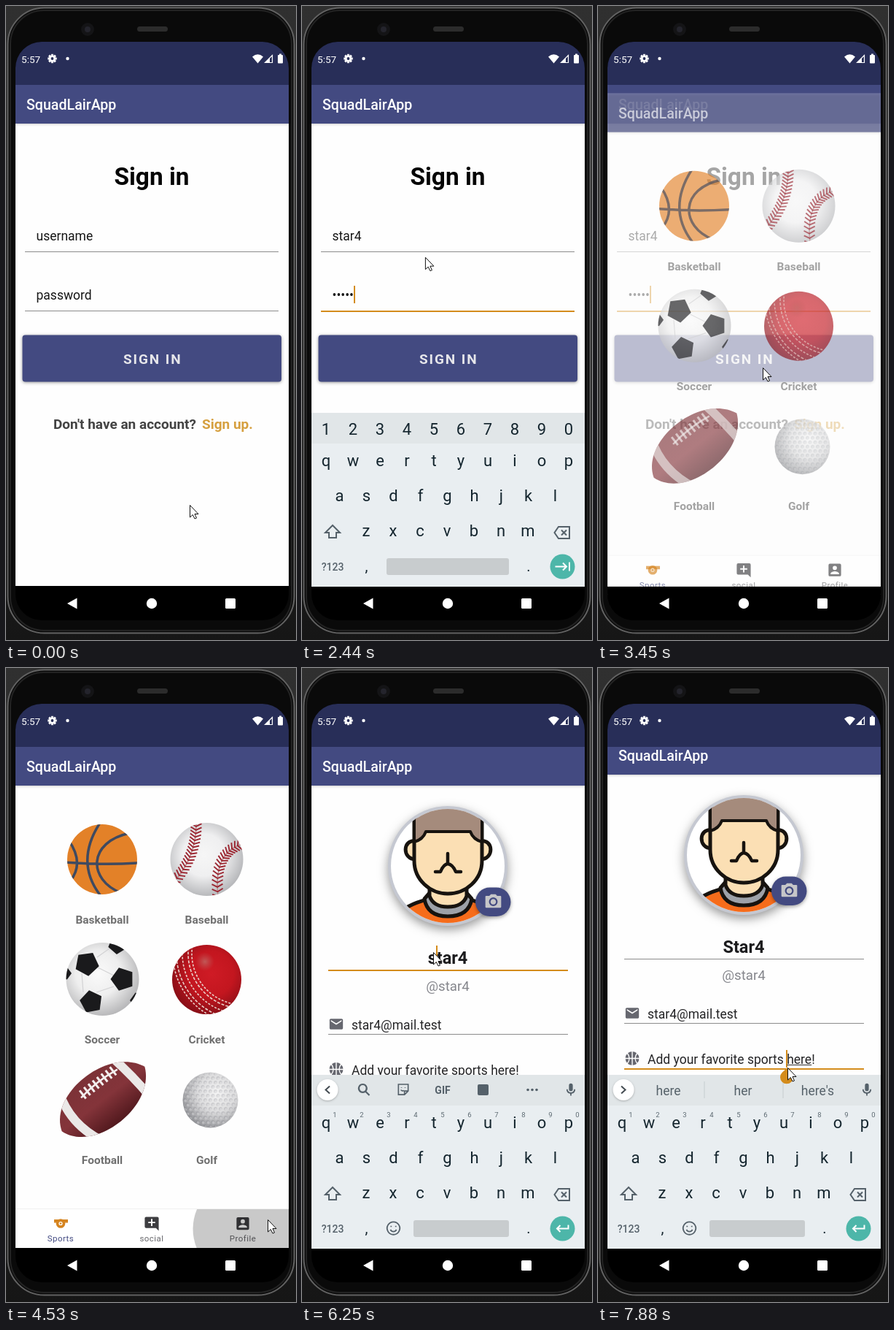
An HTML page with a canvas that plays this animation: 398 px wide and 868 px high, repeating every 8 s.

```html
<!DOCTYPE html>
<html lang="en">
<head>
<meta charset="utf-8">
<title>Sports app demo</title>
<style>
html, body { margin: 0; width: 100%; height: 100%; overflow: hidden; background: #000; }
canvas { display: block; }
</style>
</head>
<body>
<canvas id="stage" width="398" height="868"></canvas>
<script>
const c = document.getElementById('stage').getContext('2d');
const LOOP = 8000, TAU = Math.PI * 2;
const INDIGO = '#434a81', ORANGE = '#d48c1c', GRAY = '#8c8c8c', KEY = '#14252e', KEYICON = '#55616a';
const USER = 'star4';

const MAIL = 'M20 4H4c-1.1 0-2 .9-2 2v12c0 1.1.9 2 2 2h16c1.1 0 2-.9 2-2V6c0-1.1-.9-2-2-2zm0 4l-8 5-8-5V6l8 5 8-5z';
const PERSON = 'M3 5v14a2 2 0 0 0 2 2h14a2 2 0 0 0 2-2V5a2 2 0 0 0-2-2H5a2 2 0 0 0-2 2zm12 4a3 3 0 1 1-6 0 3 3 0 0 1 6 0zm-9 8c0-2 4-3.1 6-3.1s6 1.1 6 3.1v1H6z';
const ADD = 'M22 4a2 2 0 0 0-2-2H4a2 2 0 0 0-2 2v12a2 2 0 0 0 2 2h14l4 4zm-5 7h-4v4h-2v-4H7V9h4V5h2v4h4z';
const MIC = 'M12 14a3 3 0 0 0 3-3V5a3 3 0 0 0-6 0v6a3 3 0 0 0 3 3zm5-3a5 5 0 0 1-10 0H5a7 7 0 0 0 6 6.9V21h2v-3.1a7 7 0 0 0 6-6.9z';
const SEARCH = 'M15 15l6 6M10 3a6.5 6.5 0 1 0 .01 0';
const CAMERA = 'M9 3L7 5H3a1 1 0 0 0-1 1v13a1 1 0 0 0 1 1h18a1 1 0 0 0 1-1V6a1 1 0 0 0-1-1h-4l-2-2zm3 4a5.5 5.5 0 1 1 0 11 5.5 5.5 0 0 1 0-11zm0 2a3.5 3.5 0 1 0 .01 0z';
const SHIFT = 'M12 3L2 13h5v7h10v-7h5z';
const ERASE = 'M7 4h15v16H7L1.500 12zM11 8.500l7 7M18 8.500l-7 7';
const FACE = 'M12 2.500a9.500 9.500 0 1 0 .01 0M8.500 8.500v1.500M15.500 8.500v1.500M7.500 14c2 4 7 4 9 0';
const UPDATE = 'M20 12a8 8 0 1 1-3-6.300M20.500 3v5h-5M12 7.500v5l3.500 2';
const EXIT = 'M8 7V3.500h13v17H8V17M2 12h12M10.500 8l4 4-4 4';
const STICKER = 'M4 3h16v11l-6 6H4zM14 20v-6h6M9 8v1M15 8v1M8 12c1 2 4 2 5 1';
const ENTER = 'M20 7v5H5M9 7.500L4.500 12 9 16.500';
const TAB = 'M2 12h15M12.500 7l5 5-5 5M21.500 6v12';

const clamp = (v) => Math.max(0, Math.min(1, v));
const span = (t, a, b) => clamp((t - a) / (b - a));
const ease = (p) => p * p * (3 - 2 * p);

function text(s, x, y, size, color, weight = 400, align = 'left', spacing = 0) {
  c.font = `${weight} ${size}px Roboto, sans-serif`;
  c.letterSpacing = spacing + 'px';
  c.textAlign = align;
  c.fillStyle = color;
  c.fillText(s, x, y);
  return c.measureText(s).width;
}
function rect(x, y, w, h, color) { c.fillStyle = color; c.fillRect(x, y, w, h); }
function round(x, y, w, h, r, fill, stroke, lw = 1) {
  c.beginPath(); c.roundRect(x, y, w, h, r);
  if (fill) { c.fillStyle = fill; c.fill(); }
  if (stroke) { c.strokeStyle = stroke; c.lineWidth = lw; c.stroke(); }
}
function disc(x, y, r, fill) { c.beginPath(); c.arc(x, y, r, 0, TAU); c.fillStyle = fill; c.fill(); }
function draw(d, { fill, stroke, lw = 2 }) {
  const p = new Path2D(d);
  if (fill) { c.fillStyle = fill; c.fill(p, 'evenodd'); }
  if (stroke) { c.strokeStyle = stroke; c.lineWidth = lw; c.stroke(p); }
}
function icon(d, x, y, size, style) {
  c.save();
  c.translate(x - size / 2, y - size / 2);
  c.scale(size / 24, size / 24);
  draw(d, style);
  c.restore();
}
function within(shape, paint) {
  c.save(); c.beginPath(); shape(); c.clip(); paint(); c.restore();
}
function shadowed(color, blur, dy, paint) {
  c.save(); c.shadowColor = color; c.shadowBlur = blur; c.shadowOffsetY = dy; paint(); c.restore();
}
function radial(x, y, r, ...colors) {
  const g = c.createRadialGradient(x, y, 0, x, y, r);
  colors.forEach((col, i) => g.addColorStop(i / (colors.length - 1), col));
  return g;
}
function vertical(y0, y1, ...colors) {
  const g = c.createLinearGradient(0, y0, 0, y1);
  colors.forEach((col, i) => g.addColorStop(i / (colors.length - 1), col));
  return g;
}
function line(y, focused, x0, x1) {
  rect(x0, y, x1 - x0, focused ? 2 : 1, focused ? ORANGE : GRAY);
}
const caret = (x, y) => rect(Math.round(x), y, 2, 24, ORANGE);

// Phone body and system bars
function phone() {
  rect(0, 0, 398, 868, vertical(0, 868, '#303030', '#161616'));
  round(2.500, 2.500, 393, 856, 50, '#0a0a0a', '#626262', 2);
  round(6, 6, 386, 849, 46, null, '#232323', 2);
  disc(112, 32, 9, '#141416');
  disc(112, 32, 4, '#24242c');
  round(180, 28, 42, 7, 3.500, '#2c2c2c');
}
function statusBar() {
  rect(13, 49, 375, 59, '#282e58');
  text('5:57', 21, 77.500, 13.6, '#fff');
  c.save();
  c.translate(63.500, 72);
  for (let i = 0; i < 8; i++) { c.rotate(TAU / 8); rect(-1.500, -6.200, 3, 4, '#fff'); }
  disc(0, 0, 4.600, '#fff'); disc(0, 0, 1.900, '#282e58');
  c.restore();
  disc(84.500, 72, 2.200, '#fff');
  draw('M338 69.500Q345.500 63 353 69.500L345.500 78.500Z', { fill: '#fff' });
  draw('M355.500 77.500L365.500 67.500V77.500Z', { stroke: '#fff', lw: 1.2 });
  draw('M355 78L362 71V78Z', { fill: '#fff' });
  round(373, 67, 7, 11.500, 1, '#fff');
  rect(375, 65.500, 3, 2, '#fff');
}
function navButtons() {
  draw('M84 818L97.500 810.500V825.500Z', { fill: '#fff' });
  disc(200, 818, 7.200, '#fff');
  round(301, 811, 14, 14, 1.500, '#fff');
}
function page(dy = 0) {
  rect(13, 108, 375, 686, '#fefefe');
  shadowed('rgba(0,0,0,.2)', 3, 1, () => rect(13, 108 + dy, 375, 53, INDIGO));
  text('SquadLairApp', 28, 142 + dy, 19.600, '#fff', 500);
}

// Keyboard
function keyboard(kind, show, words) {
  if (show <= 0) return;
  c.save();
  c.globalAlpha = show;
  c.translate(0, 50 * (1 - show));
  rect(13, 557, 375, 238, '#e9eef1');
  rect(13, 557, 375, 42, '#e1e6e8');
  const secret = kind === 'secret', col = (i) => 33 + 37 * i;
  if (secret) {
    [...'1234567890'].forEach((d, i) => text(d, col(i), 586.500, 22, KEY, 400, 'center'));
  } else {
    toolbar(words);
    [...'1234567890'].forEach((d, i) => text(d, col(i) + 12, 615, 9.500, '#5d6a72', 400, 'center'));
  }
  const row = (keys, x, y) => [...keys].forEach((k, i) => text(k, x + 37 * i, y, 22, KEY, 400, 'center'));
  row('qwertyuiop', 33, 630);
  row('asdfghjkl', 51.500, 678);
  row('zxcvbnm', 88, 726);
  icon(SHIFT, 42, 720, 24, { stroke: KEYICON });
  icon(ERASE, 357, 721, 24, { stroke: KEYICON });
  text('?123', 42, 772.500, 14, KEYICON, 500, 'center');
  text(',', 88.500, 774, 20, KEY, 400, 'center');
  text('.', 311, 774, 20, KEY, 400, 'center');
  if (!secret) icon(FACE, 125.500, 767, 22, { stroke: KEYICON });
  const left = secret ? 116 : 153;
  round(left, 756, 284 - left, 23, 3, '#c8ccce');
  disc(357.500, 767.500, 17, '#4db6a9');
  icon(secret ? TAB : ENTER, 357.500, 767.500, 24, { stroke: '#fff' });
  c.restore();
}
function toolbar(words) {
  shadowed('rgba(0,0,0,.25)', 3, 1, () => disc(35, 577.500, 14.500, '#fff'));
  draw(words ? 'M32 572.500L37.500 577.500L32 582.500' : 'M38 572.500L32.500 577.500L38 582.500', { stroke: '#444c52', lw: 2 });
  icon(MIC, 369, 577.500, 21, { fill: KEYICON });
  if (words) {
    words.forEach((w, i) => text(w, [96.500, 199, 301.500][i], 584.500, 17.500, '#56626a', 400, 'center'));
    if (words[0]) [145.500, 253.500].forEach((x) => rect(x, 566, 1, 23, '#c5cbce'));
    return;
  }
  icon(SEARCH, 85, 577.500, 20, { stroke: KEYICON, lw: 2.6 });
  icon(STICKER, 139, 577.500, 20, { stroke: KEYICON });
  text('GIF', 193, 583, 14, KEYICON, 700, 'center');
  round(241, 570, 15, 15, 2, KEYICON);
  [-6, 0, 6].forEach((d) => disc(316 + d, 577.500, 1.800, KEYICON));
}

// Sign-in screen
function signIn(t) {
  page();
  text('Sign in', 200, 244.500, 33.400, '#050505', 700, 'center');
  const onSecret = t >= 1510, onUser = t >= 600 && !onSecret;
  const typed = t < 970 ? '' : USER.slice(0, t >= 1350 ? 5 : Math.min(4, 1 + Math.floor((t - 970) / 40)));
  const w = text(typed || 'username', 41.500, 321, 17.500, '#161616');
  if (onUser) {
    if (typed) rect(41.500, 322, w, 1, '#222');
    caret(41 + (typed ? w : 0), 302);
  }
  line(336, onUser, 26, 374);
  const dots = t < 1740 ? 0 : Math.min(5, 1 + Math.floor((t - 1740) / 80));
  const dw = text(dots ? '•'.repeat(dots) : 'password', 41.500, 401.500, 17.500, '#161616');
  if (onSecret) caret(41 + (dots ? dw : 0), 383);
  line(417, onSecret, 26, 374);
  shadowed('rgba(0,0,0,.4)', 4, 1, () => round(22.500, 450.500, 355.500, 64, 4, INDIGO));
  text('SIGN IN', 161, 490, 19, '#e6e6ea', 700, 'left', 1.9);
  text("Don't have an account?", 65, 579, 19, '#434343', 700);
  text('Sign up.', 269, 579, 19, '#d6a040', 700);
  const words = !typed ? null : typed === USER ? ['', USER, ''] : ['start', typed, 'stars'];
  keyboard(onSecret ? 'secret' : 'plain', span(t, 770, 930) * (1 - span(t, 3340, 3450)), words);
}

// Sports screen
function basketball(x, y) {
  disc(x, y, 48, '#e38128');
  within(() => c.arc(x, y, 48, 0, TAU), () => {
    c.translate(x, y);
    draw('M-50 4Q0 8 50 5M-46 -26Q-24 5 -44 30M-3 -50Q-38 4 -2 50M38 -36C-20 -24 -20 28 26 46', { stroke: '#3f4a60', lw: 3.5 });
  });
}
function stitches(x0, y0, cx, cy, x1, y1) {
  draw(`M${x0} ${y0}Q${cx} ${cy} ${x1} ${y1}`, { stroke: '#b98a8c', lw: 1.5 });
  for (let i = 0; i <= 18; i++) {
    const u = i / 18, v = 1 - u;
    const x = v * v * x0 + 2 * u * v * cx + u * u * x1, y = v * v * y0 + 2 * u * v * cy + u * u * y1;
    c.save();
    c.translate(x, y);
    c.rotate(Math.atan2(v * (cy - y0) + u * (y1 - cy), v * (cx - x0) + u * (x1 - cx)));
    draw('M-3 -7.500L1 0L-3 7.500', { stroke: '#9c2732', lw: 1.9 });
    c.restore();
  }
}
function baseball(x, y) {
  disc(x, y, 50, radial(x - 4, y - 6, 58, '#f6f6f6', '#efeff0', '#b4b5b8'));
  within(() => c.arc(x, y, 50, 0, TAU), () => {
    stitches(261, 211, 262, 256, 232, 291);
    stitches(328, 240, 284, 250, 291, 312);
  });
}
function pentagon(x, y, r, turn) {
  c.beginPath();
  for (let i = 0; i < 5; i++) c.lineTo(x + r * Math.cos(turn + i * TAU / 5), y + r * Math.sin(turn + i * TAU / 5));
  c.fillStyle = '#1a1a1c'; c.fill();
}
function soccer(x, y) {
  disc(x, y, 50, radial(x - 6, y - 8, 62, '#fafafa', '#eeeeee', '#b2b2b4'));
  within(() => c.arc(x, y, 50, 0, TAU), () => {
    draw('M126 410L148 421M124 444L148 436M104 418L106 444M125 396L142 384', { stroke: '#d2d2d4', lw: 1.2 });
    pentagon(111, 405, 17, 2.7); pentagon(160, 426, 16.500, Math.PI); pentagon(117, 457, 16, -.5);
    pentagon(153, 379, 13, .4); pentagon(81, 418, 9, 0); pentagon(181, 455, 11, Math.PI);
  });
}
function cricket(x, y) {
  disc(x, y, 47.500, radial(x + 6, y - 8, 62, '#cf1b25', '#c3161f', '#7d0d15'));
  within(() => c.arc(x, y, 47.500, 0, TAU), () => {
    [70, 75, 83, 91, 96].forEach((r, i) => {
      c.beginPath(); c.arc(325, 391, r, 1.6, 3.7);
      c.setLineDash(i % 2 ? [4, 2] : [3, 2]);
      c.strokeStyle = '#ead0ca'; c.lineWidth = 1.6; c.stroke();
    });
    c.setLineDash([]);
    disc(273, 402, 13, radial(273, 402, 13, 'rgba(190,110,105,.75)', 'rgba(190,90,90,0)'));
  });
}
function football(x, y) {
  c.save();
  c.translate(x, y); c.rotate(-.66);
  const body = 'M-72 0C-55 -52 50 -52 72 0C50 52 -55 52 -72 0Z';
  draw(body, { fill: vertical(-38, 39, '#7c3237', '#84343a', '#52191e') });
  c.clip(new Path2D(body));
  draw('M-42 -45Q-58 0 -36 45M43 -45Q52 0 53 45', { stroke: '#ebe8e7', lw: 12 });
  draw('M-23 -20Q8 -25 40 -20', { stroke: '#f3efee', lw: 2.5 });
  for (let i = 0; i < 8; i++) rect(-20 + i * 7.500, -29, 3, 14, '#f3efee');
  c.restore();
}
function golf(x, y) {
  disc(x, y, 38, radial(x + 9, y - 10, 52, '#f4f4f4', '#dcdcdd', '#8f9094'));
  within(() => c.arc(x, y, 37, 0, TAU), () => {
    for (let r = -6; r <= 6; r++) for (let k = -6; k <= 6; k++) {
      const dx = x + k * 7 + (r & 1) * 3.500, dy = y + r * 6;
      disc(dx, dy, 2.500, 'rgba(110,112,118,.22)');
      disc(dx + .6, dy + .9, 1.900, 'rgba(255,255,255,.32)');
    }
  });
}
function sports() {
  page();
  basketball(132, 262); baseball(275.500, 262); soccer(132.500, 426);
  cricket(275.500, 426.500); football(133.500, 590); golf(280.500, 591.500);
  ['Basketball', 'Baseball', 'Soccer', 'Cricket', 'Football', 'Golf'].forEach((s, i) =>
    text(s, i % 2 ? 275.500 : 132, 350 + 164.300 * (i >> 1), 15.500, '#707070', 700, 'center'));
  tabs(0);
}
function tabs(active) {
  rect(13, 741, 375, 53, '#fff');
  rect(13, 740, 375, 1, '#f0f0f0');
  const tint = (i) => i === active ? '#d58420' : '#3d3d40';
  const tone = (i) => i === active ? INDIGO : '#66666a';
  rect(66, 755, 19, 4.500, tint(0));
  disc(75, 760.500, 6.300, tint(0)); disc(75, 760.500, 2.600, '#fff'); disc(75, 760.500, 1.300, tint(0));
  icon(ADD, 200, 761, 23, { fill: tint(1) });
  icon(PERSON, 325, 760.500, 23, { fill: tint(2) });
  ['Sports', 'social', 'Profile'].forEach((s, i) => text(s, 75 + 125 * i, 785, 11.500, tone(i), 400, 'center', .45));
}
function ripple(t) {
  if (t < 4470 || t > 4710) return;
  within(() => c.rect(200, 741, 188, 53), () =>
    disc(325, 768, 40 + 28 * (t - 4470) / 60, `rgba(0,0,0,${.21 * (1 - span(t, 4580, 4710))})`));
}

// Profile screen
function avatar() {
  shadowed('rgba(0,0,0,.4)', 14, 5, () => disc(200, 271, 82, '#c5c8d1'));
  disc(200, 271, 78, '#fff');
  const ink = { stroke: '#17130f', lw: 5 }, skin = { fill: '#fbdfb4', ...ink };
  within(() => c.arc(200, 271, 78, 0, TAU), () => {
    c.lineJoin = c.lineCap = 'round';
    draw('M126 356V342Q142 324 172 317H229Q260 324 276 342V356Z', { fill: '#f66c1b', ...ink });
    draw('M168 316Q172 340 200 340Q229 340 233 316L226 308H175Z', { fill: '#9da1a8', ...ink });
    draw('M175 290V312Q180 327 200 327Q221 327 226 312V290Z', skin);
    draw('M156 237C138 234 137 262 156 262ZM245 237C263 234 264 262 245 262Z', skin);
    draw('M154 208V264C154 290 176 309 200 309C225 309 247 290 247 264V208Z', skin);
    draw('M154 185H247V238Q235 235 231 224H170Q166 235 154 238Z', { fill: '#a58b7c', ...ink, lw: 4 });
    draw('M200 254V267M183 279H190Q194 269 200 268Q207 269 211 279H218', { ...ink, lw: 4.5 });
    c.lineJoin = 'miter'; c.lineCap = 'butt';
  });
  shadowed('rgba(0,0,0,.35)', 5, 2, () => round(238, 300.500, 48.500, 39.500, 19.700, INDIGO));
  icon(CAMERA, 262.500, 319.500, 26, { fill: '#c6c6c8' });
}
function action(y, color, glyph, ix, label, tx) {
  shadowed('rgba(0,0,0,.35)', 3, 1, () => round(32, y, 336.500, 46.500, 4, color));
  icon(glyph, ix, y + 23.500, 21, { stroke: '#fff', lw: 2.2 });
  text(label, tx, y + 28.500, 13.800, '#fff', 500, 'left', 1.25);
}
function profile(t) {
  const rise = ease(span(t, 7680, 7830)), dy = -15 * rise;
  const onName = t >= 5740 && t < 7630, onSports = t >= 7630;
  within(() => c.rect(13, 108, 375, 686), () => {
    page(dy);
    c.translate(0, dy);
    avatar();
    const name = t < 6480 ? USER : t < 6590 ? USER.slice(1) : 'S' + USER.slice(1);
    const w = text(name, 200, 405, 23.500, '#1c1c1e', 700, 'center');
    if (onName && t >= 5790) {
      const head = t >= 6480 && t < 6590 ? 0 : c.measureText(name[0]).width;
      caret(199 - w / 2 + head, 380);
    }
    line(413, onName, 36, 365);
    text('@' + USER, 200, 442, 18.700, '#85868c', 400, 'center');
    icon(MAIL, 47, 487.500, 22, { fill: '#66676f' });
    text(USER + '@mail.test', 68, 494.500, 17.500, '#242426');
    line(501, false, 36, 365);
    disc(47, 549.500, 9.500, '#66676f');
    draw('M37 549.500H57M47 539V560M40 542Q46 549.500 40 557M54 542Q48 549.500 54 557', { stroke: '#fff', lw: 1.4 });
    text('Add your favorite sports here!', 68, 556.500, 17.500, '#242426');
    const before = c.measureText('Add your favorite sports ').width, word = c.measureText('here').width;
    line(563, onSports, 36, 365);
    if (onSports) {
      caret(67 + before, 538);
      if (t >= 7830) rect(68 + before, 558, word, 1, '#333');
    }
    action(601, INDIGO, UPDATE, 168, 'UPDATE', 188);
    action(658.500, '#c42b43', EXIT, 165, 'LOG OUT', 184.500);
    tabs(2);
  });
  const first = span(t, 5900, 6080) * (1 - span(t, 6990, 7122));
  keyboard('plain', first || rise, onSports && t >= 7830 ? ['here', 'her', "here's"] : null);
  if (onSports) draw(`M259 ${563 + dy}L265.500 ${569 + dy}A9 9 0 1 1 252.500 ${569 + dy}Z`, { fill: ORANGE });
}

// Pointer stops: time, x, y
const STOPS = [
  [30, 252, 683], [540, 163, 328], [2320, 163, 328], [2960, 226, 495], [3670, 226, 495], [4440, 359, 755],
  [4940, 359, 755], [5090, 188, 331], [5260, 188, 331], [5350, 179, 420], [5510, 179, 420], [5700, 180, 389],
  [6620, 180, 389], [6960, 94, 820], [7310, 94, 820], [7600, 260, 547], [LOOP, 260, 547]];
function pointer(t) {
  const i = Math.max(1, STOPS.findIndex((s) => s[0] > t));
  const [ta, xa, ya] = STOPS[i - 1], [tb, xb, yb] = STOPS[i];
  const p = ease(span(t, ta, tb));
  c.save();
  c.translate(xa + (xb - xa) * p + .5, ya + (yb - ya) * p + .5);
  draw('M0 0V16.500L3.800 13L6.500 18.500L9 17.500L6.500 12H11.500Z', { fill: '#fff', stroke: '#111', lw: 1 });
  c.restore();
}

function render(t) {
  phone();
  within(() => c.roundRect(13, 49, 375, 792, 36), () => {
    rect(13, 49, 375, 792, '#000');
    const enter = span(t, 3345, 3510);
    if (enter < 1) signIn(t);
    if (enter > 0 && t < 4570) {
      c.save();
      c.globalAlpha = enter;
      c.translate(0, 40 * (1 - ease(enter)));
      sports();
      c.restore();
      if (enter < 1) rect(13, 795, 375, 46, '#000');
    }
    if (t >= 4570) profile(t);
    ripple(t);
    statusBar();
    navButtons();
  });
  pointer(t);
}
function tick() {
  render(performance.now() % LOOP);
  requestAnimationFrame(tick);
}
tick();
</script>
</body>
</html>
```
